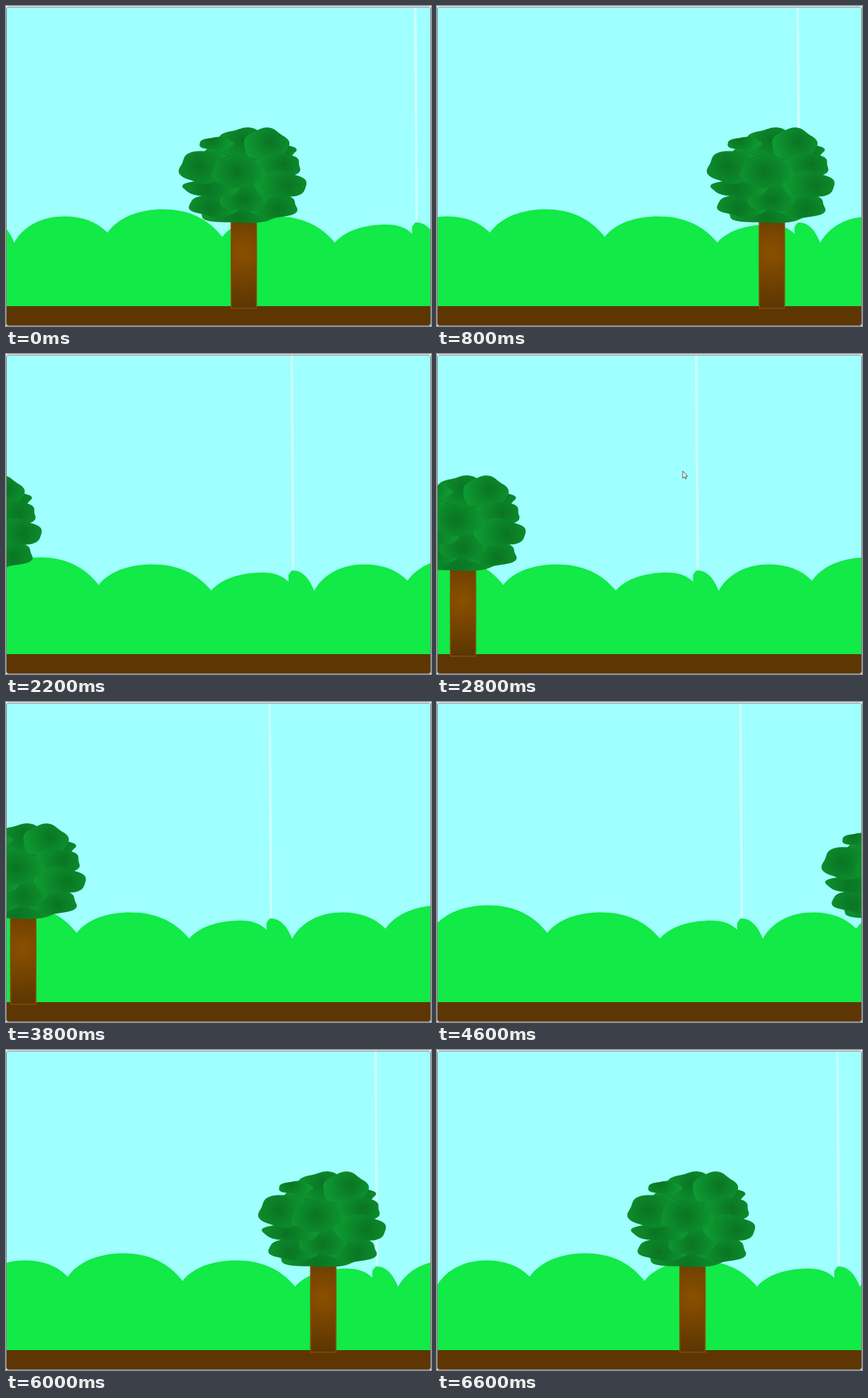
Recreate the animation shown at these times as an HTML page with a canvas. Size 600x451 px, loop 6800 ms.

```html
<!DOCTYPE html>
<html lang="en">
<head>
<meta charset="utf-8">
<title>Scrolling tree</title>
<style>
  html, body { margin: 0; width: 100%; height: 100%; overflow: hidden; background: #fff; }
  canvas { display: block; }
</style>
</head>
<body>
<canvas id="stage" width="600" height="451"></canvas>
<script>
const ctx = document.getElementById('stage').getContext('2d');

const LOOP = 6800, FRAME = 200, FRAMES = LOOP / FRAME;
const HILL_STEP = 6.23, TREE_STEP = 2 * HILL_STEP;
const HILL_WIDTH = 598;
const GROUND = 423;
const TREE_X = 333.3, TREE_Y = 240, TREE_WRAP = 722.6, TREE_MIN = -61.3;

const mod = (a, n) => ((a % n) + n) % n;

// Scroll out with a slight slowdown, then back at a constant speed
function stepsAt(frame) {
  const out = 2.879 * frame - 0.0321 * frame ** 2;
  const back = 2.17 * (FRAMES - frame);
  return Math.round(Math.min(out, back));
}

// One tile of hills, x measured from the seam
function makeHills() {
  const path = new Path2D();
  let x = 31, y = 334;
  path.moveTo(x, GROUND);
  path.lineTo(x, y);
  const hump = (peakX, peakY, endX, endY) => {
    const up = peakX - x, down = endX - peakX;
    path.bezierCurveTo(x + up * 0.2, y + (peakY - y) * 0.68, peakX - up * 0.42, peakY, peakX, peakY);
    path.bezierCurveTo(peakX + down * 0.42, peakY, endX - down * 0.24, endY + (peakY - endY) * 0.66, endX, endY);
    [x, y] = [endX, endY];
  };
  hump(102, 296.5, 163, 319.5);
  hump(242, 286.5, 325, 325.5);
  hump(401, 296.5, 484, 333.5);
  hump(557, 308, 593, 321);
  path.lineTo(593, 311);
  hump(599, 305, 629.5, 334.5);
  path.lineTo(x, GROUND);
  return path;
}

function radial(x, y, r, inner, outer) {
  const gradient = ctx.createRadialGradient(x, y, 0, x, y, r);
  gradient.addColorStop(0, inner);
  gradient.addColorStop(1, outer);
  return gradient;
}

// A wavy oval, darkest on the side away from the middle of the tree
function leaf(cx, cy, rx, ry) {
  const path = new Path2D();
  for (let a = 0; a < Math.PI * 2; a += 0.1) {
    const r = 1 + 0.05 * Math.sin(5 * a + cx) + 0.04 * Math.sin(3 * a + cy);
    path.lineTo(cx + rx * r * Math.cos(a), cy + ry * r * Math.sin(a));
  }
  const darkX = cx + (cx - TREE_X) * 0.2, darkY = cy + (cy - TREE_Y) * 0.1;
  return { path, fill: radial(darkX, darkY, rx * 1.1, '#0a7423', '#0e9831') };
}

// From back to front
const leaves = [
  leaf(333, 242, 66, 54),
  leaf(329, 295, 54, 11),
  leaf(376, 282, 36, 17),
  leaf(296, 281, 37, 16),
  leaf(335, 270, 34, 20),
  leaf(292, 256, 41, 13),
  leaf(283, 227, 39, 23),
  leaf(380, 205, 30, 11),
  leaf(335, 193, 35, 21),
  leaf(367, 195, 32, 22),
  leaf(382, 225, 35, 17),
  leaf(297, 194, 24, 9),
  leaf(387, 252, 37, 19),
  leaf(327, 234, 37, 22)
];

const hills = makeHills();
const bark = radial(335, 348, 76, '#8b5000', '#5c3602');
const pointer = new Path2D('M347 165v10l2.2-2 1.6 3 1.6-.8-1.5-3h2.6z');
const border = new Path2D();
border.roundRect(0.5, 1.5, 599, 449, 3);

function drawHills(seam) {
  ctx.fillStyle = '#11ea47';
  for (let x = seam - 2 * HILL_WIDTH; x < 600; x += HILL_WIDTH) {
    ctx.save();
    ctx.translate(x, 0);
    ctx.fill(hills);
    ctx.restore();
  }
  ctx.beginPath();
  ctx.moveTo(seam - 0.5, 2);
  ctx.lineTo(seam + 1.5, 305);
  ctx.lineWidth = 3.5;
  ctx.strokeStyle = 'rgba(255,255,255,.45)';
  ctx.stroke();
}

function drawTree(centre) {
  ctx.save();
  ctx.translate(centre - TREE_X, 0);
  ctx.beginPath();
  ctx.rect(318, 290, 35.5, 136);
  ctx.fillStyle = bark;
  ctx.fill();
  ctx.lineWidth = 1.7;
  ctx.strokeStyle = '#87490b';
  ctx.stroke();
  for (const { path, fill } of leaves) {
    ctx.fillStyle = fill;
    ctx.fill(path);
  }
  ctx.restore();
}

function drawPointer() {
  ctx.fillStyle = '#fff';
  ctx.fill(pointer);
  ctx.lineWidth = 0.9;
  ctx.strokeStyle = '#444';
  ctx.stroke(pointer);
}

function draw(time) {
  const frame = Math.floor((time % LOOP) / FRAME);
  const steps = stepsAt(frame);

  ctx.fillStyle = '#fff';
  ctx.fillRect(0, 0, 600, 451);
  ctx.save();
  ctx.clip(border);
  ctx.fillStyle = '#a0ffff';
  ctx.fillRect(0, 0, 600, 451);
  drawHills(578.3 - steps * HILL_STEP);
  ctx.fillStyle = '#5e3603';
  ctx.fillRect(0, GROUND, 600, 28);
  drawTree(mod(TREE_X - TREE_MIN + steps * TREE_STEP, TREE_WRAP) + TREE_MIN);
  if (frame >= 13 && frame <= 15) drawPointer();
  ctx.restore();
  ctx.lineWidth = 1;
  ctx.strokeStyle = '#858585';
  ctx.stroke(border);
}

const start = performance.now();
function tick() {
  draw(performance.now() - start);
  requestAnimationFrame(tick);
}
tick();
</script>
</body>
</html>
```
